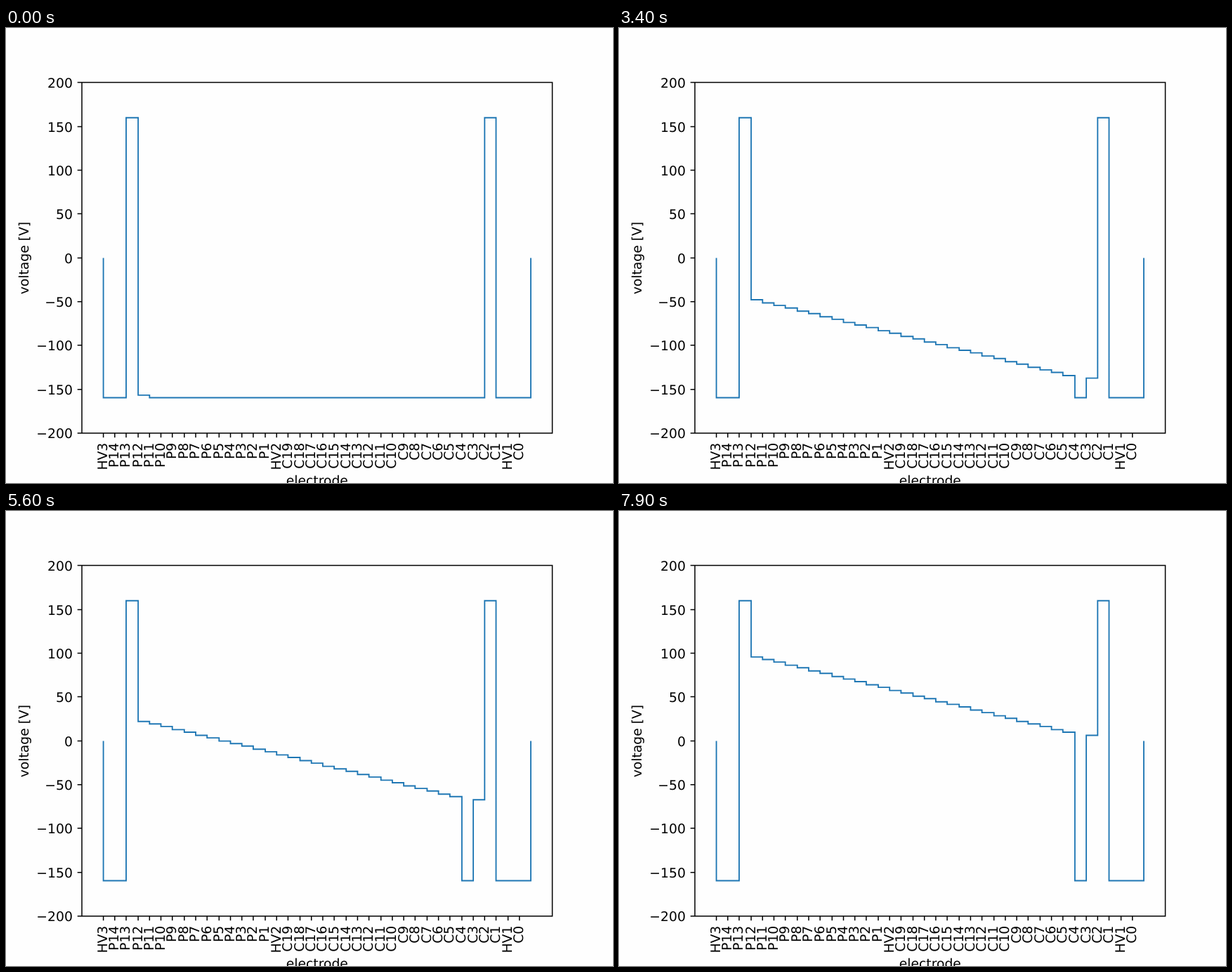
Write an HTML page that moves like this. It is 864 px wide and 648 px high and loops after 8 s.

```html
<!DOCTYPE html>
<html lang="en">
<head>
<meta charset="utf-8">
<title>Electrode voltages</title>
<style>
html, body { margin: 0; width: 100%; height: 100%; overflow: hidden; background: #fefefe; }
svg { display: block; width: 864px; height: 648px; }
text { font: 20.833px "DejaVu Sans", sans-serif; text-rendering: geometricPrecision; }
path { fill: none; stroke: #000; stroke-width: 1.667; }
#steps { stroke: #1f77b4; stroke-width: 2.083; stroke-miterlimit: 10; }
</style>
</head>
<body>
<svg viewBox="0 0 960 720">
  <path id="axes"/>
  <path id="steps"/>
  <g id="labels"></g>
</svg>
<script>
// Chart units: 960 x 720, with every line snapped to whole units.
const LEFT = 120, RIGHT = 864, TOP = 86, BOTTOM = 641;
const BINS = 37, LOW = -160, HIGH = 160, STEP = 3.2, TICK = 7;
const px = edge => Math.round(LEFT + (edge + 1.85) * (RIGHT - LEFT) / 40.7);
const py = volts => Math.round(363.6 - volts * 1.386);
const $ = id => document.getElementById(id);

function label(text, x, y, anchor, turned) {
  const el = document.createElementNS('http://www.w3.org/2000/svg', 'text');
  el.textContent = text;
  el.setAttribute('text-anchor', anchor);
  el.setAttribute('transform', `translate(${x} ${y})` + (turned ? ' rotate(-90)' : ''));
  $('labels').append(el);
}

const countDown = (prefix, n) => Array.from({ length: n }, (_, i) => prefix + (n - i));
const electrodes = ['HV3', ...countDown('P', 14), 'HV2', ...countDown('C', 19), 'HV1', 'C0'];

let axes = `M${LEFT} ${TOP}H${RIGHT}V${BOTTOM}H${LEFT}Z`;
for (let v = -200; v <= 200; v += 50) {
  axes += `M${LEFT} ${py(v)}h${-TICK}`;
  label(String(v).replace('-', '\u2212'), 105.4, py(v) + 8, 'end');
}
electrodes.forEach((name, i) => {
  axes += `M${px(i)} ${BOTTOM}v${TICK}`;
  label(name, px(i) + 6, 656.4, 'end', true);
});
$('axes').setAttribute('d', axes);
label('electrode', (LEFT + RIGHT) / 2, 723, 'middle');
label('voltage [V]', 35, py(0), 'middle', true);

// A ramp rises behind the left barrier; bin 31 stays low and is skipped by it.
function voltage(bin, n) {
  if (bin === 2 || bin === 33) return HIGH;
  if (bin < 2 || bin > 33 || bin === 31) return LOW;
  const offset = bin === 32 ? 28 : bin - 3;
  return LOW + STEP * Math.max(0, n + 1 - offset);
}

function draw(now) {
  const n = Math.floor(now % 8000 / 100);
  let d = `M${px(0)} ${py(0)}`;
  for (let bin = 0; bin < BINS; bin++) d += `V${py(voltage(bin, n))}H${px(bin + 1)}`;
  $('steps').setAttribute('d', d + `V${py(0)}`);
}

const start = performance.now();
function tick() {
  draw(performance.now() - start);
  requestAnimationFrame(tick);
}
tick();
</script>
</body>
</html>
```
